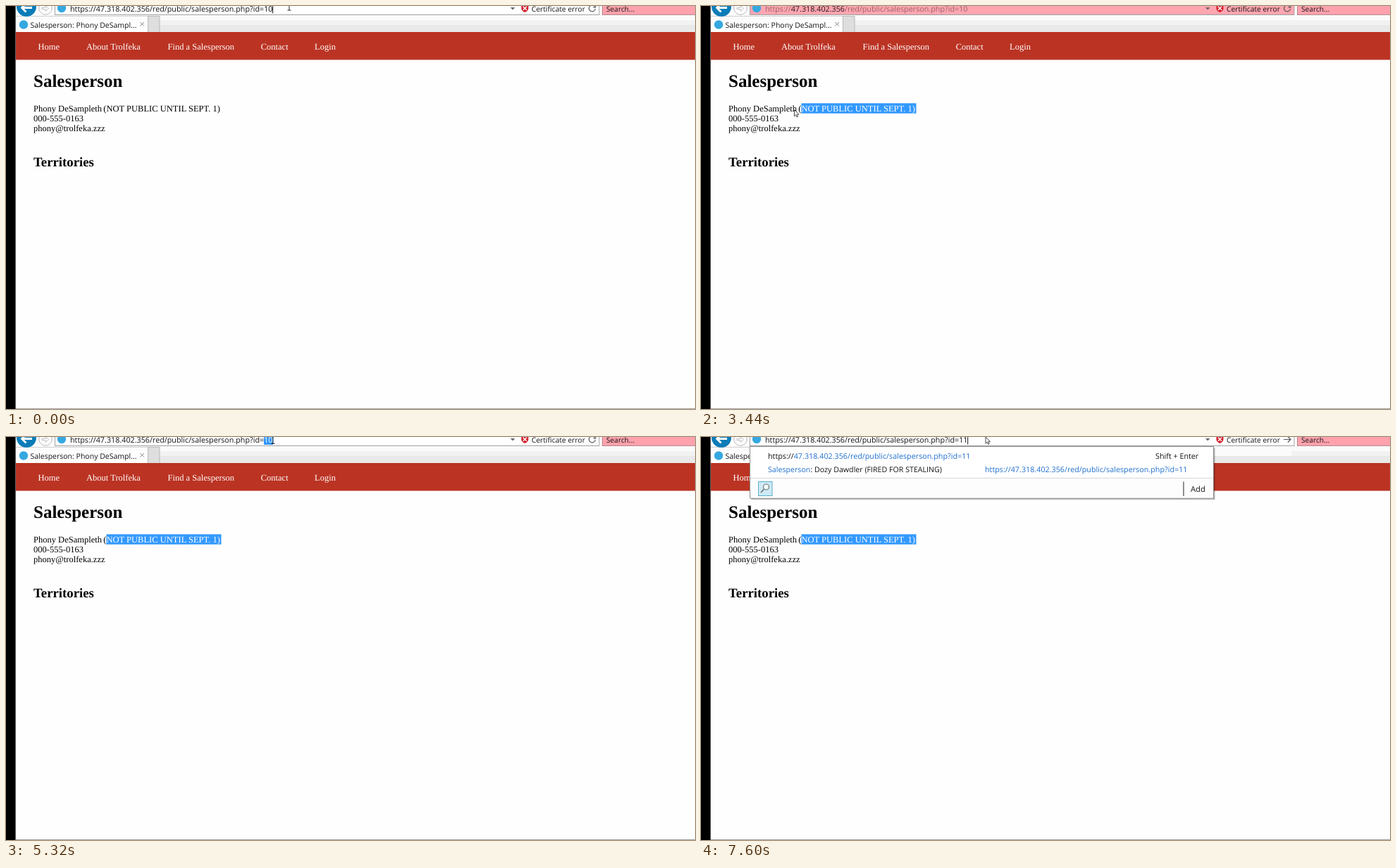
These frames come from a looping animation (978x573 px, 8000 ms). An HTML page:

```html
<!DOCTYPE html>
<html lang="en">
<head>
<meta charset="utf-8">
<title>Salesperson</title>
<style>
html, body { margin: 0; width: 100%; height: 100%; overflow: hidden; background: #fefefe; }
svg { display: block; width: 978px; height: 573px; }
text { text-rendering: geometricPrecision; white-space: pre; }
.ui { font: 10.78px "Open Sans", "Noto Sans", sans-serif; fill: #141414; }
.page { font: 12.52px "Liberation Serif", "Times New Roman", serif; fill: #000; }
.h1 { font-size: 25px; font-weight: bold; }
.h2 { font-size: 18.8px; font-weight: bold; }
.inv { fill: #fff; }
.link { fill: #2070cc; }
.sel { fill: #3399ff; }
.line { fill: none; stroke: #8f8f8f; }
#url.dim { fill: #98656d; }
#url.dim .host { fill: #24181a; }
#url.all, #url.num .id { fill: #fff; }
</style>
</head>
<body>
<svg viewBox="0 0 978 573">
  <rect width="978" height="573" fill="#fefefe"/>

  <!-- tab strip -->
  <rect x="14" y="13" width="964" height="7" fill="#fbfbfb"/>
  <rect x="218" y="20" width="760" height="7" fill="#f2f2f2"/>
  <rect x="218" y="27" width="760" height="10" fill="#e9e9e9"/>
  <path class="line" d="M14 14.5H201.5V37" style="stroke:#d0d0d0"/>
  <rect x="201.5" y="14.5" width="16.5" height="23" fill="#dedede" stroke="#b8b8b8"/>
  <circle cx="25" cy="26.500" r="6.2" fill="#35a8e0"/>
  <text class="ui" x="34.5" y="30.700" style="font-size:10.5px">Salesperson: Phony DeSampl...</text>
  <path class="line" d="M190.500 23l5.500 5.500M196 23l-5.500 5.500" style="stroke:#888"/>

  <!-- toolbar -->
  <circle cx="29" cy="1" r="14" fill="#0b7cb8"/>
  <path d="M37 2.500H23M28.500-3.500L22.500 2.500L28.500 8.500" fill="none" stroke="#fff" stroke-width="2.8"/>
  <circle cx="56" cy="3" r="9.3" fill="#fff" stroke="#b5b5b5"/>
  <path d="M51 2.300h5V-.500l4.500 4-4.500 4V4.700h-5z" fill="#fff" stroke="#b5b5b5" stroke-width=".9"/>
  <rect id="field" x="69.5" y="-12" width="772.5" height="24.5" fill="#fff" stroke="#a0a0a0"/>
  <circle cx="79" cy="3" r="6.2" fill="#35a8e0"/>
  <rect id="urlSel" class="sel" x="366" y="0" height="11"/>
  <text id="url" class="ui" x="91" y="7.7">https://<tspan class="host">47.318.402.356</tspan>/red/public/salesperson.php?id=<tspan class="id num">10</tspan></text>
  <rect id="caret" y="0" width="1" height="10.5" fill="#111"/>
  <path d="M716 2h6.500l-3.250 3.500z" fill="#666"/>
  <path d="M731.500-1.500h10V4q-.5 3-5 5q-4.500-2-5-5z" fill="#d3212d"/>
  <path d="M734 .800l5 5M739 .800l-5 5" stroke="#fff" stroke-width="1.5"/>
  <text class="ui" x="746" y="7.7" style="font-size:10.3px">Certificate error</text>
  <path id="reload" d="M835.500 .500A4.500 4.500 0 1 0 836.500 4M836.800-1.500V1.800H833.500" fill="none" stroke="#555" stroke-width="1.2"/>
  <path id="go" d="M827 3.500H837M833-.500l4 4-4 4" fill="none" stroke="#555" stroke-width="1.2"/>
  <rect x="846.5" y="-12" width="140" height="24.5" fill="#ffa2ad" stroke="#b98a90"/>
  <text class="ui" x="852" y="7.7" style="font-size:10.2px">Search...</text>

  <!-- page -->
  <rect x="14" y="37" width="964" height="39.5" fill="#bb3323"/>
  <g class="page">
    <text class="inv" x="45.5" y="61.5">Home</text>
    <text class="inv" x="114" y="61.5">About Trolfeka</text>
    <text class="inv" x="229.5" y="61.5">Find a Salesperson</text>
    <text class="inv" x="361.7" y="61.5">Contact</text>
    <text class="inv" x="438" y="61.5">Login</text>
    <text class="h1" x="39" y="115">Salesperson</text>
    <rect id="pageSel" class="sel" x="142.5" y="138.3" width="163" height="14.4"/>
    <text x="39" y="149.5">Phony DeSampleth</text>
    <text x="138.3" y="149.5">(</text>
    <text id="note" x="142.5" y="149.5">NOT PUBLIC UNTIL SEPT. 1)</text>
    <text x="39" y="163.9">000-555-0163</text>
    <text x="39" y="178.2">phony@trolfeka.zzz</text>
    <text class="h2" x="39" y="228">Territories</text>
  </g>
  <rect x="14" y="572" width="964" height="1" fill="#a0a0a0"/>

  <!-- suggestions -->
  <g id="menu">
    <rect x="728" y="13" width="110" height="14" fill="#fbfbfb"/>
    <rect x="71" y="15" width="658.5" height="74" fill="#000" opacity=".3"/>
    <rect x="69.5" y="13.5" width="658" height="73.5" fill="#fff" stroke="#909090"/>
    <rect x="70" y="59" width="657" height="27.5" fill="#fdfdfd"/>
    <path class="line" d="M70 58.500H727" style="stroke:#d8d8d8"/>
    <g class="ui">
      <text x="95" y="30.7">https://<tspan class="link">47.318.402.356/red/public/salesperson.php?id=<tspan class="num">11</tspan></tspan></text>
      <text x="645" y="30.7">Shift + Enter</text>
      <text x="95" y="50" style="font-size:10.65px"><tspan class="link">Salesperson</tspan>: <tspan id="person"></tspan></text>
      <text class="link" x="403" y="50">https://47.318.402.356/red/public/salesperson.php?id=<tspan id="hit">11</tspan></text>
      <text x="695" y="78" style="font-size:11.2px">Add</text>
    </g>
    <rect x="81.5" y="63.5" width="19.5" height="20" fill="#cdeaf6" stroke="#58aecb"/>
    <circle cx="92.5" cy="71" r="4" fill="#eef9fd" stroke="#777" stroke-width="1.2"/>
    <path d="M89.500 74l-4.500 5" stroke="#777" stroke-width="1.8"/>
    <path d="M685 63.500V84" stroke="#555" stroke-width="1.3"/>
  </g>

  <path id="beam" d="M-2.500-5h5M0-5V5M-2.500 5h5" fill="none" stroke="#222"/>
  <path id="arrow" d="M.5 .500V9.800L2.600 7.800L4.200 11L5.600 10.300L4.100 7.200H7z" fill="#fff" stroke="#333" stroke-width=".9"/>
  <rect width="13.6" height="573" fill="#000"/>
</svg>
<script>
const LOOP = 8000;
const $ = id => document.getElementById(id);
const beam = (x, y) => ({ ptr: 'beam', x, y });
const arrow = (x, y) => ({ ptr: 'arrow', x, y });
const bg = (field, more) => ({ field, ...more });

// Each step changes only the listed properties.
const steps = [
  [0, { ...beam(402, 1), field: '#fff', url: 'on', id: '10', caret: 1, note: 0, menu: 0 }],
  [410, beam(407.5, 4.5)],
  [640, { caret: 0 }],
  [1050, { caret: 1 }],
  [1630, { caret: 0 }],
  [2190, { caret: 1 }],
  [2350, { ptr: '' }],
  [2500, arrow(435, 69)],
  [2650, arrow(390, 102)],
  [2780, arrow(347, 126.5)],
  [2930, bg('#ffdfe3', { ...beam(322, 149), caret: 0, url: 'dim' })],
  [3050, bg('#ffc2ca', beam(310, 149))],
  [3170, bg('#ffa6b1', beam(303, 149))],
  [3320, { ...arrow(48, 167), note: 1 }],
  [3440, arrow(132, 147)],
  [3560, arrow(69, 147)],
  [3700, arrow(102, 147)],
  [3820, arrow(141, 148)],
  [4350, arrow(341, 20)],
  [4500, bg('#ffabb6', { ...arrow(362, 10), url: 'on' })],
  [4630, bg('#ffb0bb', arrow(375, 7))],
  [4750, bg('#ffb5c0', arrow(379, 5))],
  [4900, bg('#fff', { url: 'all' })],
  [5050, beam(379, 4.5)],
  [5320, { url: 'num' }],
  [5890, { url: 'all' }],
  [6040, beam(376, 4.5)],
  [6190, { ...beam(379, 4.5), url: 'on', caret: 1 }],
  [6310, beam(384, 4.5)],
  [6430, beam(389, 4.5)],
  [6550, beam(393, 4.5)],
  [6690, arrow(403.5, -.5)],
  [7290, { menu: 1, id: '1', person: 'Phony DeSampleth (NOT PUBLIC UNTIL SEPT. 1)', hit: '10' }],
  [7600, { id: '11', person: 'Dozy Dawdler (FIRED FOR STEALING)', hit: '11' }],
];

let merged = {};
const states = steps.map(([t, change]) => [t, merged = { ...merged, ...change }]);
const show = (id, on) => $(id).style.display = on ? '' : 'none';

function draw(s) {
  const end = s.id.length > 1 ? 379 : 372.7;
  for (const id of ['beam', 'arrow']) {
    show(id, s.ptr === id);
    $(id).setAttribute('transform', `translate(${s.x} ${s.y})`);
  }
  $('field').setAttribute('fill', s.field);
  $('url').setAttribute('class', 'ui ' + s.url);
  const from = s.url === 'all' ? 91 : 366;
  show('urlSel', s.url === 'all' || s.url === 'num');
  $('urlSel').setAttribute('x', from);
  $('urlSel').setAttribute('width', end - from);
  document.querySelectorAll('tspan.num').forEach(e => e.textContent = s.id);
  show('caret', s.caret);
  $('caret').setAttribute('x', end - .8);
  show('pageSel', s.note);
  $('note').setAttribute('class', s.note ? 'inv' : '');
  show('menu', s.menu);
  show('reload', !s.menu);
  show('go', s.menu);
  $('person').textContent = s.person || '';
  $('hit').textContent = s.hit || '';
}

let start, last;
function tick(now) {
  start ??= now;
  const t = (now - start) % LOOP;
  const state = states.findLast(([at]) => at <= t)[1];
  if (state !== last) draw(last = state);
  requestAnimationFrame(tick);
}
draw(states[0][1]);
requestAnimationFrame(tick);
</script>
</body>
</html>
```
